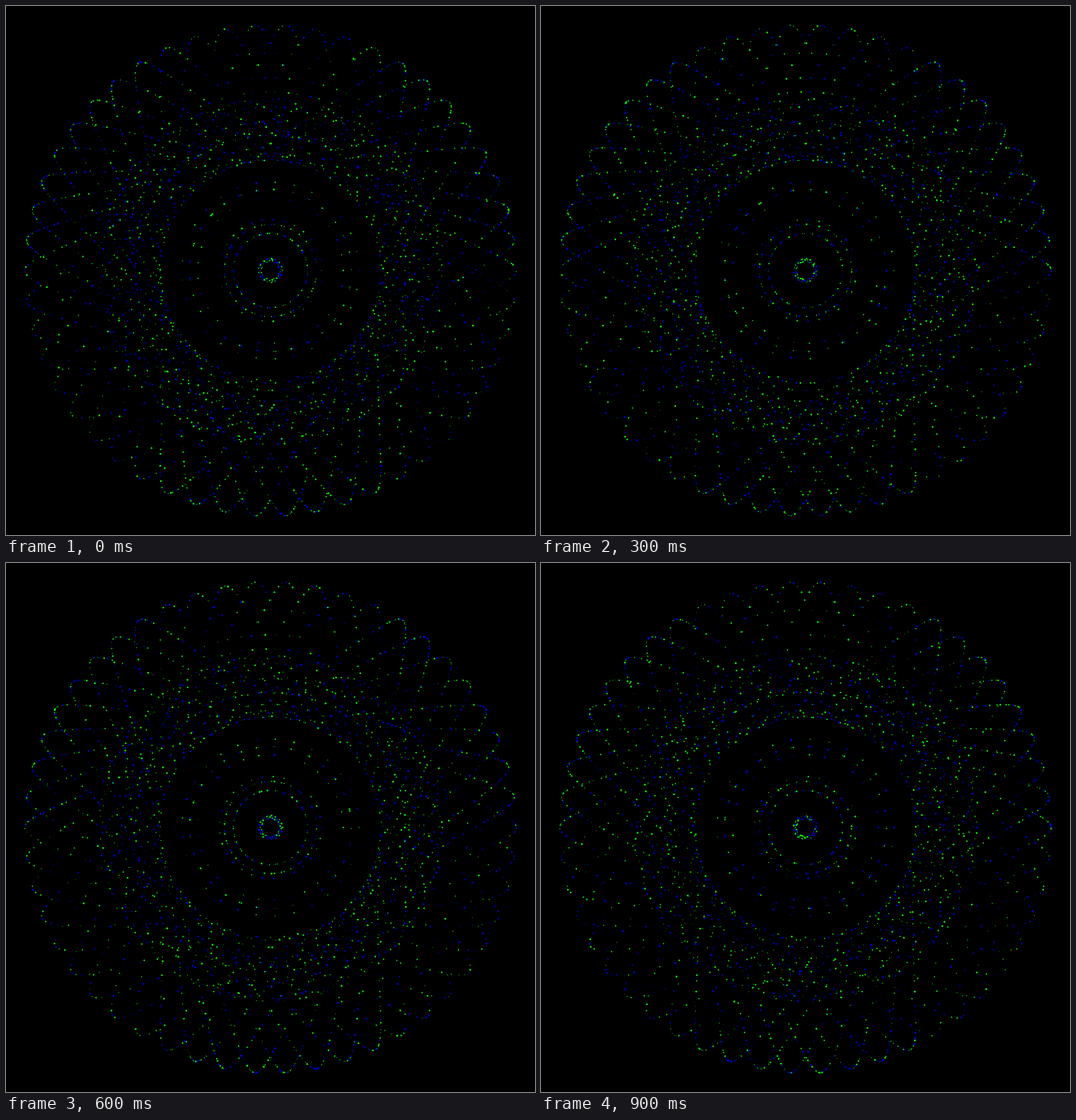
These frames come from a looping animation (748x748 px, 1 s). An HTML page with a canvas:

```html
<!DOCTYPE html>
<html>
<head>
<meta charset="utf-8">
<style>
html, body { margin: 0; height: 100%; background: #000; overflow: hidden; }
canvas { display: block; }
</style>
</head>
<body>
<canvas id="stage" width="748" height="748"></canvas>
<script>
const ctx = document.getElementById('stage').getContext('2d');
const CENTER = 374, STEP = 100, POSES = 10;

// Trochoids: inner radius, outer radius, tips, turns to close, turns drawn, dots
const rings = [
  [155.5, 347.5, 50, 17, 25.5, 2150],
  [190, 243, 25, 6, 6, 640],
  [103, 125, 29, 6, 6, 116],
  [50, 72, 29, 8, 8, 145],
  [12.5, 17, 17, 3, 3, 75]
];

const dots = rings.flatMap(([inner, outer, tips, turns, drawn, count]) => {
  const a = (outer + inner) / 2, b = (outer - inner) / 2, k = tips / turns - 1;
  return Array.from({ length: count }, (_, i) => {
    const t = 2 * Math.PI * drawn * i / count;
    return [
      CENTER + a * Math.cos(t) + b * Math.cos(k * t),
      CENTER - a * Math.sin(t) + b * Math.sin(k * t)
    ];
  });
});

function randomizer(seed) {
  return () => {
    seed = (seed + 0x6D2B79F5) | 0;
    let n = Math.imul(seed ^ seed >>> 15, seed | 1);
    n ^= n + Math.imul(n ^ n >>> 7, n | 61);
    return ((n ^ n >>> 14) >>> 0) / 4294967296;
  };
}

// Every pose gives each dot a fresh colour and size
function draw(pose) {
  const random = randomizer(pose * 7919 + 17);
  ctx.fillStyle = '#000';
  ctx.fillRect(0, 0, 748, 748);
  for (const [x, y] of dots) {
    ctx.fillStyle = random() < 0.5 ? '#0f0' : '#00f';
    ctx.beginPath();
    ctx.arc(x, y, 0.4 + random() * 0.9, 0, 7);
    ctx.fill();
  }
}

const start = performance.now();
let shown = -1;
function tick() {
  const pose = Math.floor((performance.now() - start) / STEP) % POSES;
  if (pose !== shown) draw(shown = pose);
  requestAnimationFrame(tick);
}
tick();
</script>
</body>
</html>
```
